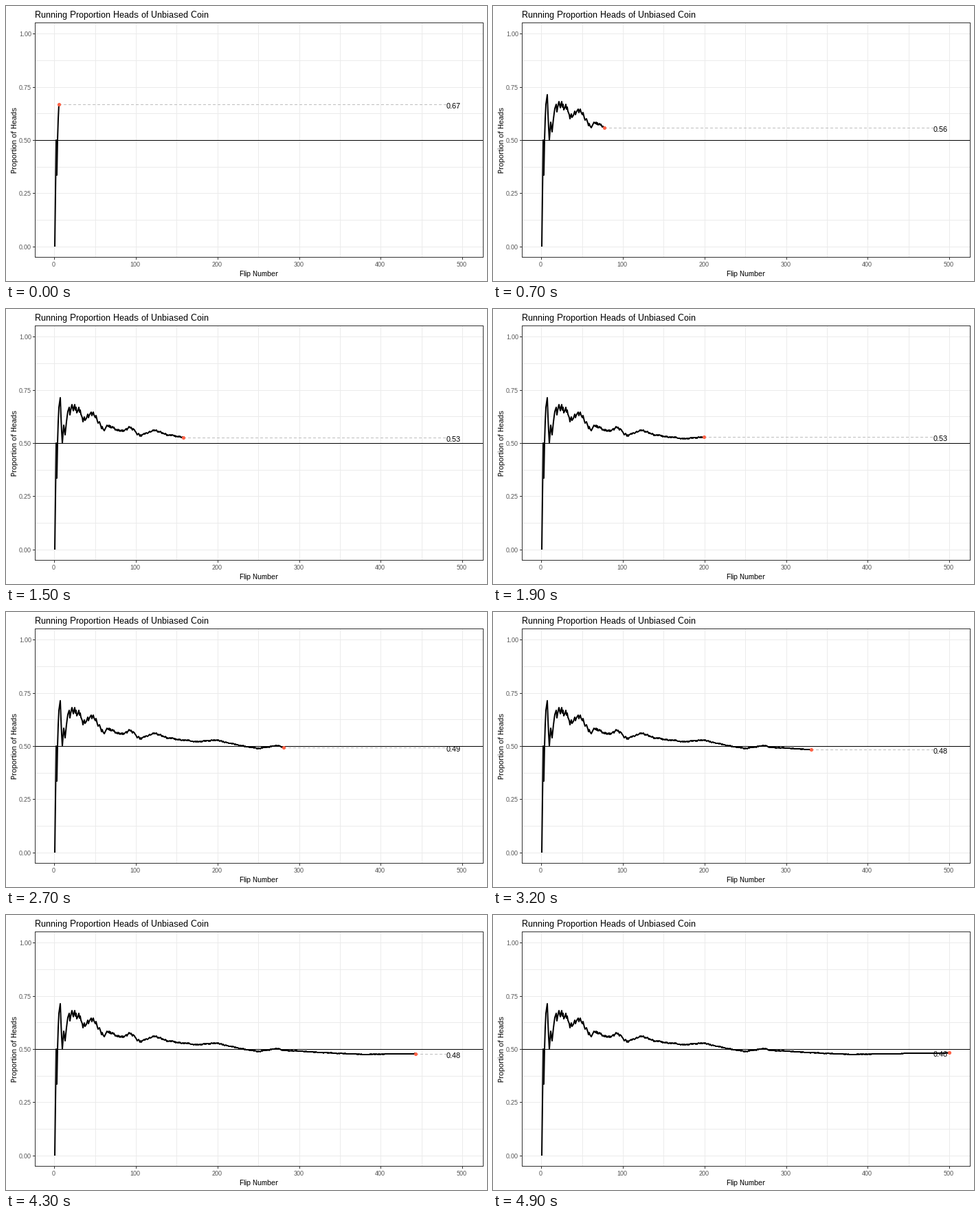
A matplotlib script that plays this animation: 700 px wide and 400 px high, repeating every 5000 ms.

```python
import matplotlib.pyplot as plt
import numpy as np
from matplotlib.animation import FuncAnimation

W, H, DPI = 700, 400, 100
PT = 72 / DPI  # points per pixel
FRAMES, FLIPS = 50, 500

plt.rcParams.update({
    "font.family": "Liberation Sans",
    "text.hinting": "native",
    "text.hinting_factor": 1,
})

# Key points (flip, heads so far); heads fall evenly between them.
KEY_POINTS = [(1, 0), (2, 1), (3, 1), (7, 5), (10, 5), (21, 14), (32, 21),
              (35, 21), (48, 31), (61, 34), (65, 38), (83, 46), (94, 54),
              (105, 56), (123, 69), (137, 74), (175, 91), (199, 105),
              (250, 122), (273, 137), (281, 139), (382, 181), (500, 241)]


def running_proportion():
    flips = np.arange(1, FLIPS + 1)
    return np.rint(np.interp(flips, *zip(*KEY_POINTS))) / flips


def px(flip):
    return np.rint(70.2 + 1.1878 * np.asarray(flip))


def py(share):
    return np.rint(349.6 - 309.45 * np.asarray(share))


fig = plt.figure(figsize=(W / DPI, H / DPI), dpi=DPI, facecolor="white")
ax = fig.add_axes([0, 0, 1, 1])
ax.set(xlim=(0, W), ylim=(H, 0))
ax.axis("off")


def rule(xs, ys, color, z=1, **kw):
    """One-pixel line, snapped to the pixel at each integer position."""
    return ax.plot(xs, ys, color=color, lw=PT, aa=False, snap=True, zorder=z,
                   solid_capstyle="butt", **kw)[0]


def label(x, y, text, size, color="black", ha="center", **kw):
    return ax.text(x, y, text, fontsize=size * PT, color=color, ha=ha,
                   va="baseline", zorder=6, **kw)


LEFT, RIGHT, TOP, BOTTOM = 42, 694, 24, 365
GRID, DARK, TICK_TEXT = "#EBEBEB", "#333333", "#4D4D4D"

for flip in range(0, FLIPS + 1, 50):
    x = px(flip)
    rule([x, x], [TOP, BOTTOM], GRID)
    if flip % 100 == 0:
        rule([x, x], [BOTTOM, BOTTOM + 3], DARK)
        label(x - 1, 379, str(flip), 9, TICK_TEXT)

for share in np.linspace(0, 1, 9):
    y = py(share)
    rule([LEFT, RIGHT], [y, y], GRID)
    if share % 0.25 == 0:
        rule([LEFT - 3, LEFT], [y, y], DARK)
        label(37, y + 4, f"{share:.2f}", 9, TICK_TEXT, ha="right")

rule([LEFT, RIGHT], [py(0.5)] * 2, "black", z=3)
rule([LEFT, RIGHT, RIGHT, LEFT, LEFT], [TOP, TOP, BOTTOM, BOTTOM, TOP], DARK, z=7)

label(42, 17, "Running Proportion Heads of Unbiased Coin", 13, ha="left")
label(368, 393, "Flip Number", 11)
label(16, 195, "Proportion of Heads", 11, rotation=90, rotation_mode="anchor")

proportion = running_proportion()
xs, ys = px(np.arange(1, FLIPS + 1)), py(proportion)
LABEL_X = px(480)

leader = rule([], [], "#BEBEBE", z=2, dashes=(4, 4))
curve, = ax.plot([], [], color="black", lw=2 * PT, zorder=4, snap=False,
                 solid_joinstyle="round", solid_capstyle="butt")
dot = ax.add_patch(plt.Circle((0, 0), 2.6, fc="#FF6347", lw=0, zorder=5))
value = label(LABEL_X, 0, "", 11, ha="left")


def draw(frame):
    step = (FLIPS - 1) / (FRAMES - 1)
    n = min(FLIPS, int(1 + step * (frame + 0.5)))
    x, y = xs[n - 1], ys[n - 1]
    curve.set_data(xs[:n], ys[:n])
    dot.center = (x + 0.5, y + 0.5)
    leader.set_data([x, LABEL_X], [y, y])
    value.set_position((LABEL_X + 1, y + 6))
    value.set_text(f"{proportion[n - 1]:.2f}")
    return curve, dot, leader, value


animation = FuncAnimation(fig, draw, frames=FRAMES, interval=100,
                          repeat=True, repeat_delay=0)
plt.show()
```
